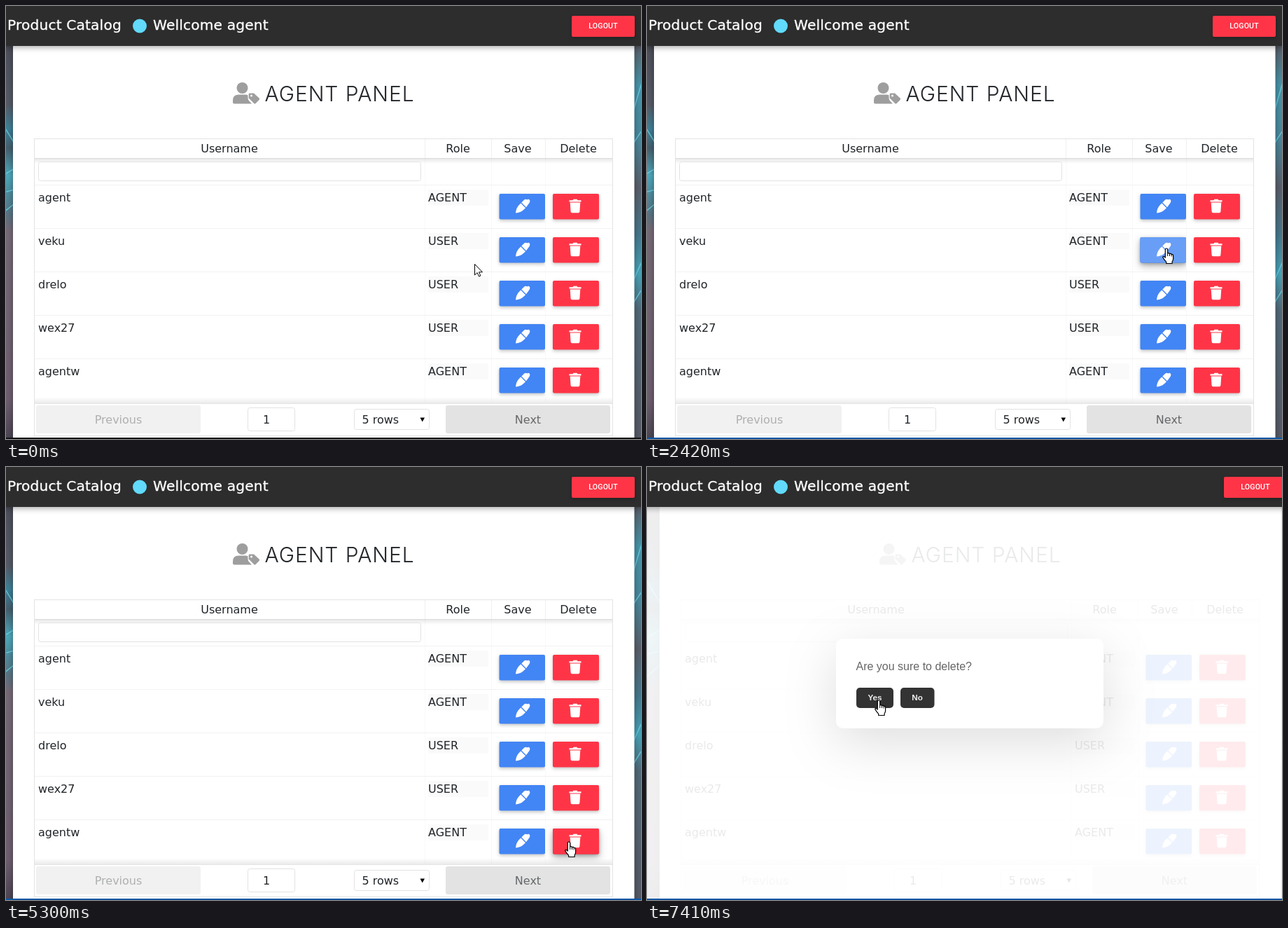
Recreate the animation shown at these times as an HTML page. Size 907 by 618 pixels, loop 8 s.

```html
<!DOCTYPE html>
<html lang="en">
<head>
<meta charset="utf-8">
<title>Product Catalog</title>
<style>
html, body { margin: 0; width: 100%; height: 100%; overflow: hidden; background: #fff; }
#stage { display: block; width: 907px; height: 618px; }
text { font: 16px "DejaVu Sans", sans-serif; fill: #212529; white-space: pre; }
.mid { text-anchor: middle; }
.brand { font-size: 20.2px; fill: #fff; stroke: #fff; stroke-width: .3px; letter-spacing: .15px; }
.title { font: 300 30px Inter, sans-serif; letter-spacing: .9px; }
.logout { font: 500 10.6px Roboto, sans-serif; fill: #fff; letter-spacing: .15px; }
.note { font: 500 14px Roboto, sans-serif; fill: #fff; }
.ask { font: 16px "Liberation Sans", Arial, sans-serif; fill: #666; }
.choice { font: bold 11.7px "Liberation Sans", Arial, sans-serif; fill: #eee; }
.btn { filter: drop-shadow(0 2px 2.5px rgba(0,0,0,.24)); }
.lift { filter: drop-shadow(0 5px 6px rgba(0,0,0,.25)); }
.panel { filter: drop-shadow(0 3px 5px rgba(0,0,0,.4)); }
.head { filter: drop-shadow(0 2px 4px rgba(0,0,0,.35)); }
.dialog { filter: drop-shadow(0 20px 36px rgba(0,0,0,.13)); }
.snack { filter: drop-shadow(0 1px 3px rgba(0,0,0,.3)); }
.icon { fill: #fff; }
.box { fill: #fff; stroke: #e2e2e2; }
</style>
</head>
<body>
<svg id="stage" viewBox="0 0 907 618"></svg>
<script>
const LOOP = 8000;
const BLUE = '#4285f4', RED = '#ff3547';
const ROW_TOP = 255, ROW_H = 62;
const users = [
  ['agent', 'AGENT'], ['veku', 'USER'], ['drelo', 'USER'],
  ['wex27', 'USER'], ['agentw', 'AGENT']
];

const rect = (x, y, w, h, fill, more = '') =>
  `<rect x="${x}" y="${y}" width="${w}" height="${h}" fill="${fill}" ${more}/>`;
const text = (x, y, s, more = '') => `<text x="${x}" y="${y}" ${more}>${s}</text>`;
const mid = (x, y, s, more = '') => text(x, y, s, `class="mid" ${more}`);
const path = (d, more = '') => `<path d="${d}" ${more}/>`;
const line = (x1, y1, x2, y2, alpha) =>
  path(`M${x1} ${y1}L${x2} ${y2}`, `stroke="#000" stroke-opacity="${alpha}"`);
const field = (x, y, w, h) => rect(x + .5, y + .5, w - 1, h - 1, '#fff', 'class="box" rx="3"');
const gradient = (id, stops) => `<linearGradient id="${id}" x2="0" y2="1">` +
  stops.map(([at, c, a = 1]) => `<stop offset="${at}" stop-color="${c}" stop-opacity="${a}"/>`).join('') +
  '</linearGradient>';

const PEN = 'M-10 10q.4-7 5-11.700l2.300-2.300 6.700 6.700-2.300 2.300q-4.700 4.600-11.700 5Z' +
  'M-1.700-5l4-4q2.300-1.600 4 .1 2-1.500 3.400 0 1.500 1.600 0 4.200L5 1.700Z';
const TRASH = 'M-8.500-8.300h5l1-1.500h5l1 1.500h5v2.400h-17Z' +
  'M-7.300-4.900h14.600l-.9 12.900a2 2 0 0 1-2 1.800h-8.800a2 2 0 0 1-2-1.800Z';

function button(id, x, y, w, color, icon, cx) {
  const h = 36.5;
  return rect(x, y, w, h, color, `id="${id}Lift" class="lift" rx="2" opacity="0"`) +
    rect(x, y, w, h, color, 'class="btn" rx="2"') +
    `<clipPath id="${id}Clip">${rect(x, y, w, h, '#fff', 'rx="2"')}</clipPath>` +
    `<g clip-path="url(#${id}Clip)"><circle id="${id}Wave" r="0" fill="#fff"/></g>` +
    path(icon, `class="icon" transform="translate(${cx} ${y + 17.5})"`);
}

function row([name, role], i) {
  const y = ROW_TOP + i * ROW_H;
  return text(46, y + 24, name) +
    rect(603, y + 7, 86, 23, '#fafafa') +
    (i === 1 ? rect(603, y + 9, 0, 19, '#3390ff', 'id="mark"') : '') +
    text(603, y + 24, role, `id="role${i}"`) +
    `<svg x="694" y="${y}" width="76" height="${ROW_H}" viewBox="694 ${y} 76 ${ROW_H}">` +
    button('save' + i, 704.5, y + 13, 65.5, BLUE, PEN, 738) + '</svg>' +
    button('del' + i, 781, y + 13, 66, RED, TRASH, 813) +
    (i < 4 ? line(41, y + 62.5, 866, y + 62.5, .05) : '');
}

const defs = '<defs>' +
  gradient('left', [[0, '#4e505b'], [.15, '#565c68'], [.21, '#3f8299'], [.26, '#46606f'],
    [.33, '#4fa9bd'], [.38, '#4f8b9d'], [.43, '#5b7483'], [.47, '#776b77'],
    [.9, '#6f5f70'], [1, '#4c4654']]) +
  gradient('right', [[0, '#5b606b'], [.1, '#4795a9'], [.24, '#4a879b'], [.36, '#5a5f6b'],
    [.48, '#46788c'], [.58, '#48a3b8'], [.67, '#526a79'], [1, '#565a66']]) +
  gradient('down', [[0, '#000', .1], [1, '#000', 0]]) +
  gradient('up', [[0, '#000', 0], [1, '#000', .08]]) + '</defs>';

const backdrop = rect(-10, 57, 40, 561, 'url(#left)') + rect(880, 57, 40, 561, 'url(#right)') +
  path('M-10 160L12 196M-10 245L12 232M-10 268L12 262M-10 300L12 282' +
    'M896 150L912 96M896 196L912 172M896 392L912 356M896 424L912 398',
    'stroke="#6fe3f7" stroke-opacity=".7" stroke-width="1.500" fill="none"');

const heading =
  `<g fill="#9e9e9e"><circle cx="337.5" cy="117" r="8"/>` +
  path('M324 137.5v-3q0-8 8.5-8h10q1.5 0 3 .7v4q0 2.5 2 4.5l3.5 3.8H326q-2 0-2-2Z') +
  path('M347.5 124.5h6.5l7.6 7q1 1.2 0 2.4l-5 5q-1.2 1-2.4 0l-7.5-7.5v-6Z') +
  '<circle cx="350.5" cy="128" r="1.5" fill="#fff"/></g>' +
  text(369.5, 136, 'AGENT PANEL', 'class="title"');

const table =
  rect(40.5, 189.5, 826, 424, '#fff', 'stroke="#000" stroke-opacity=".11"') +
  [598.5, 693.5, 770.5].map(x => line(x, 190, x, 217, .06) + line(x, 217, x, 566, .025)).join('') +
  rect(41, 217, 825, 8, 'url(#down)') + line(41, 217.5, 866, 217.5, .05) +
  mid(319, 208.5, 'Username') + mid(645.5, 208.5, 'Role') +
  mid(731, 208.5, 'Save') + mid(817.5, 208.5, 'Delete') +
  field(46, 222, 547, 28) + line(41, 255.5, 866, 255.5, .05) +
  users.map(row).join('') +
  rect(41, 558, 825, 9, 'url(#up)') + rect(41, 567, 825, 46, '#fff') +
  line(41, 567.5, 866, 567.5, .1) +
  rect(43, 570, 235, 40, '#f1f1f1', 'rx="3"') + mid(160.5, 595.5, 'Previous', 'fill-opacity=".32"') +
  field(345, 573, 68, 34) + mid(372, 595.5, '1') +
  field(497, 575, 108, 30) + text(508.5, 595.5, '5 rows') +
  path('M591.5 587.5h6.5l-3.25 6Z') +
  rect(628, 570, 235, 40, '#e3e3e3', 'rx="3"') + mid(745.5, 595.5, 'Next', 'fill-opacity=".65"');

const dialog = '<g id="veil" opacity="0">' +
  rect(0, 57, 907, 561, '#fff', 'fill-opacity=".9"') +
  rect(270, 245, 382, 128, '#fff', 'class="dialog" rx="10"') +
  text(298.5, 289.5, 'Are you sure to delete?', 'class="ask"') +
  rect(299, 315, 53, 29, '#333', 'rx="5"') + rect(362, 315, 48.5, 29, '#333', 'rx="5"') +
  text(325.5, 333, 'Yes', 'class="choice mid"') + text(386, 333, 'No', 'class="choice mid"') + '</g>';

const header = rect(-10, 0, 927, 57, '#2d2d2d', 'class="head"') +
  text(2, 34, 'Product Catalog', 'class="brand"') +
  '<circle cx="191" cy="28.5" r="10" fill="#61dafb"/>' +
  text(210, 34, 'Wellcome agent', 'class="brand"') +
  `<g id="logout">${rect(808, 14, 90, 30, RED, 'class="btn" rx="2"')}` +
  text(853, 32, 'LOGOUT', 'class="logout mid"') + '</g>';

const snack = `<g id="snack">${rect(316, 0, 275, 48, '#323232', 'class="snack" rx="3"')}` +
  text(338, 28, 'Changes saved', 'class="note"') + '</g>';

const OUTLINE = 'fill="#fff" stroke="#000" stroke-linejoin="round"';
const cursors = '<g id="cursor">' +
  path('M.5.5V16l3.6-3.4 2.5 5.4 2.3-1-2.4-5.2h5Z', `id="arrow" ${OUTLINE}`) +
  '<g id="hand">' +
  path('M-1.7 1.6q0-1.6 1.7-1.6t1.7 1.6V7q1.7-.8 2.8.6 2-.6 2.7.8 2.4-.2 2.4 2v4.6' +
    'q0 2-1.5 4v2.5h-8.4v-2.2q-3.6-3.8-5-6.8.6-2 2.6-.4l1 1Z', `${OUTLINE} stroke-width="1.2"`) +
  path('M1.7 6.5V11M4.5 7.6V11M7.2 8.4V11.5', 'stroke="#000" fill="none"') + '</g>' +
  path('M-3-8H-1L0-7 1-8H3M0-7V7M-3 8H-1L0 7 1 8H3', 'id="beam" stroke="#222" fill="none"') + '</g>';

const $ = id => document.getElementById(id);
$('stage').innerHTML = defs +
  `<g id="page">${backdrop}${rect(10, 40, 887.5, 600, '#fff', 'class="panel"')}${heading}${table}</g>` +
  dialog + header + snack + rect(0, 616, 907, 2, '#111', 'id="edge"') + cursors;

// time, x, y, shape from here on
const track = [
  [50, 669, 368, 'arrow'], [260, 664, 347, 'beam'], [500, 652, 337, 'beam'],
  [690, 652, 337, 'beam'], [940, 585, 322, 'beam'], [1250, 585, 322, 'arrow'],
  [1470, 640, 385, 'arrow'], [1540, 660, 378, 'arrow'], [1600, 717, 354, 'hand'],
  [1640, 718, 354, 'hand'], [1870, 741, 349, 'hand'], [2040, 741, 349, 'hand'],
  [2360, 742, 346, 'hand'], [2700, 742, 346, 'hand'], [2750, 738, 346, 'hand'],
  [4600, 738, 346, 'hand'], [4720, 746, 372, 'arrow'], [5130, 798, 518, 'hand'],
  [5250, 803, 537, 'hand'], [5300, 804, 535, 'hand'], [5800, 802, 534, 'arrow'],
  [6520, 802, 534, 'arrow'], [6900, 560, 430, 'arrow'], [7210, 345, 343, 'hand'],
  [7280, 329, 336, 'hand'], [7350, 330, 335, 'hand'], [7400, 331, 333, 'hand']
];

const ramp = (t, from, to) => Math.min(1, Math.max(0, (t - from) / (to - from)));
const smooth = u => u * u * (3 - 2 * u);
const out = u => 1 - (1 - u) * (1 - u);
const set = (id, name, value) => $(id).setAttribute(name, value);

function moveCursor(t) {
  let i = 0;
  while (i < track.length - 1 && track[i + 1][0] <= t) i++;
  const [t0, x, y, kind] = track[i];
  const [t1, x1, y1] = track[i + 1] || [LOOP, x, y];
  const u = ramp(t, t0, t1);
  set('cursor', 'transform', `translate(${x + (x1 - x) * u} ${y + (y1 - y) * u})`);
  for (const k of ['arrow', 'hand', 'beam']) $(k).style.display = k === kind ? '' : 'none';
}

function wave(id, cx, cy, r, alpha) {
  set(id, 'cx', cx);
  set(id, 'cy', cy);
  set(id, 'r', r);
  set(id, 'opacity', alpha);
}

function editRole(t) {
  const typed = Math.floor((t - 1000) / 65) + 1;
  const marked = typed < 1 ? ramp(t, 700, 930) : 0;
  $('role1').textContent = typed < 1 ? 'USER' : 'AGENT'.slice(0, typed);
  $('role1').style.fill = marked > .6 ? '#fff' : '';
  set('mark', 'x', 646 - 43 * marked);
  set('mark', 'width', 43 * marked);
}

function draw(t) {
  const shifted = t >= 5800;
  set('page', 'transform', `translate(${shifted ? 8 : 0} 0)`);
  set('logout', 'transform', `translate(${shifted ? 16 : 0} 0)`);
  set('edge', 'fill', t < 450 ? '#111' : '#0b57a4');
  editRole(t);

  set('save1Lift', 'opacity', ramp(t, 1550, 1700) - ramp(t, 2600, 2750));
  set('del4Lift', 'opacity', ramp(t, 5130, 5300) - ramp(t, 5800, 6100));
  wave('save1Wave', 742, 350, 50 * out(ramp(t, 2080, 2420)), t < 2610 ? .2 : 0);
  wave('del4Wave', 803, 535, 54 * ramp(t, 5560, 6180), .2 * (1 - ramp(t, 6120, 6250)));

  const raised = out(ramp(t, 2940, 3170)) - smooth(ramp(t, 4470, 4740));
  set('snack', 'transform', `translate(0 ${626 - 50 * raised})`);
  set('veil', 'opacity', smooth(ramp(t, 6000, 6370)));
  moveCursor(t);
}

function tick() {
  draw(performance.now() % LOOP);
  requestAnimationFrame(tick);
}
tick();
</script>
</body>
</html>
```
